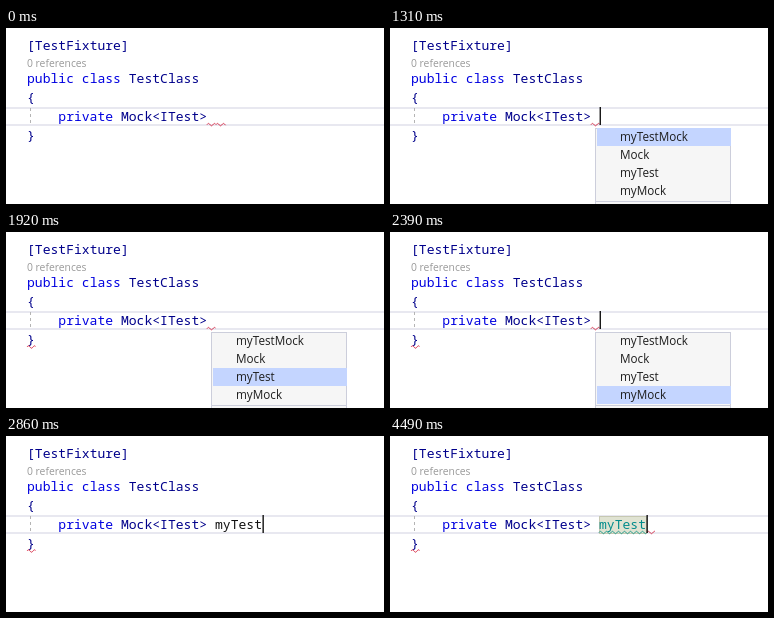
These frames come from a looping animation (378x176 px, 4.87 s). An HTML page:

```html
<!DOCTYPE html>
<html lang="en">
<head>
<meta charset="utf-8">
<title>Name suggestions</title>
<style>
  html, body { margin: 0; width: 100%; height: 100%; overflow: hidden; background: #fff; }
  svg { display: block; width: 378px; height: 176px; }
  .code { font: 13.06px "Noto Sans Mono", "DejaVu Sans Mono", monospace; fill: #00008b; white-space: pre; }
  .key { fill: #0000e0; }
  .ui { font-family: "Open Sans", "Noto Sans", sans-serif; }
  .wave { fill: none; stroke-width: 1; }
  .red { stroke: #d8304a; }
  .teal { stroke: #1f9a8c; }
</style>
</head>
<body>
<svg viewBox="0 0 378 176">
  <g fill="#e8e8f0">
    <rect y="79" width="378" height="2"/>
    <rect y="96" width="378" height="2"/>
  </g>
  <path d="M24.5 80V98" stroke="#b4b4b4" stroke-dasharray="3 3"/>
  <rect id="mark" x="209.5" y="80.5" width="47" height="17" fill="#e0e3d2" stroke="#c6c8b2"/>

  <g class="code">
    <text x="21" y="22">[TestFixture]</text>
    <text x="21" y="55"><tspan class="key">public class</tspan> TestClass</text>
    <text x="21" y="74">{</text>
    <text x="52.3" y="93"><tspan class="key">private</tspan> Mock&lt;ITest&gt;</text>
    <text x="21" y="111.5">}</text>
    <text id="plain" x="209" y="93" style="fill:#111">myTest</text>
    <text id="typed" x="209" y="93" style="fill:#008b8b">myTest</text>
  </g>
  <text class="ui" x="21" y="39" font-size="10.35" fill="#999">0 references</text>

  <path id="gapWave" class="wave red"/>
  <path id="nextWave" class="wave red"/>
  <path id="braceWave" class="wave red"/>
  <path id="nameWave" class="wave teal"/>
  <path id="endWave" class="wave red"/>

  <rect id="caretA" x="209.6" y="79" width="1.3" height="18"/>
  <rect id="caretB" x="256.5" y="79" width="1.3" height="18"/>

  <g id="popup">
    <rect x="205.5" y="100.5" width="135" height="80" fill="#f6f6f6" stroke="#cccedb"/>
    <path d="M205 173.5H341" stroke="#cccedb"/>
    <rect id="pick" x="207" width="134" height="18" fill="#c4d5ff"/>
    <g id="items" class="ui" font-size="11.7" fill="#1e1e1e"></g>
  </g>
</svg>
<script>
  const LOOP = 4870;
  const NAMES = ["myTestMock", "Mock", "myTest", "myMock"];
  const $ = id => document.getElementById(id);

  // visible spans as [from, to) in ms
  const SHOWN = {
    gapWave: [[0, 2860]],
    nextWave: [[0, 450]],
    caretA: [[300, 830], [1310, 1840], [2390, 2860]],
    popup: [[680, 2860]],
    braceWave: [[1920, LOOP]],
    plain: [[2860, 3090]],
    caretB: [[2860, 2940], [3490, 3950], [4410, LOOP]],
    typed: [[3090, LOOP]],
    nameWave: [[3090, LOOP]],
    endWave: [[3090, LOOP]],
    mark: [[4490, LOOP]]
  };
  // [time, selected item]
  const PICKS = [[0, 0], [1610, 1], [1690, 2], [2070, 3], [2560, 2]];

  function wave(id, from, to, y) {
    let d = "";
    for (let x = from; x <= to; x += 0.5) {
      const dy = -1.2 * Math.sin((x - from) * Math.PI / 3);
      d += `${d ? "L" : "M"}${x} ${(y + dy).toFixed(2)}`;
    }
    $(id).setAttribute("d", d);
  }
  wave("gapWave", 201, 209.5, 96.6);
  wave("nextWave", 210, 219.5, 96.6);
  wave("braceWave", 21, 29.5, 115);
  wave("nameWave", 209, 256.5, 96.5);
  wave("endWave", 257, 265, 96.5);

  NAMES.forEach((name, i) => {
    const label = document.createElementNS("http://www.w3.org/2000/svg", "text");
    label.setAttribute("x", 230);
    label.setAttribute("y", 113 + 18 * i);
    label.textContent = name;
    $("items").append(label);
  });

  function draw(t) {
    for (const id in SHOWN) {
      const on = SHOWN[id].some(([from, to]) => t >= from && t < to);
      $(id).style.display = on ? "" : "none";
    }
    const row = PICKS.filter(([at]) => t >= at).pop()[1];
    $("pick").setAttribute("y", 100 + 18 * row);
  }

  const start = performance.now();
  function tick() {
    draw((performance.now() - start) % LOOP);
    requestAnimationFrame(tick);
  }
  tick();
</script>
</body>
</html>
```
